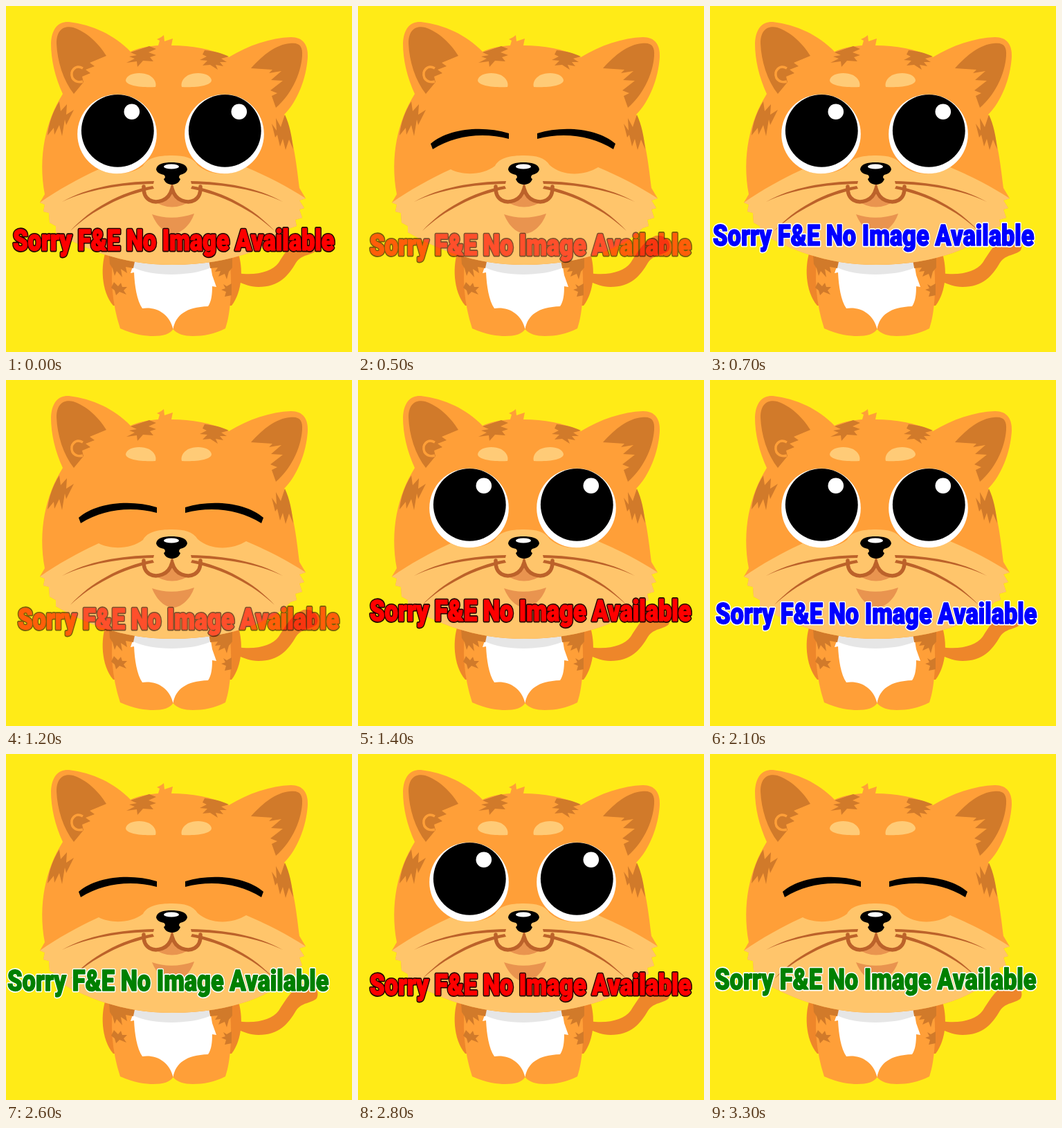
These frames come from a looping animation (500 px wide and 500 px high, 3.5 s). An HTML page:

```html
<!DOCTYPE html>
<html lang="en">
<head>
<meta charset="utf-8">
<title>No image available</title>
<style>
html, body { margin: 0; width: 100%; height: 100%; overflow: hidden; background: #ffeb17; }
svg { display: block; width: 100vw; height: 100vh; }

.base { fill: #ff9f38; }
.shade { fill: #ee862a; }
.dark { fill: #d17a2a; }
.light { fill: #ffc56b; }
.brow { fill: #ffcb77; }
.lip { fill: #e9944f; }
.whisker { fill: #bc622a; }
.mouth { fill: none; stroke: #bc622a; stroke-width: 5.5; stroke-linecap: round; }

/* Eyes: 500 ms open, 200 ms shut */
.open { animation: open 700ms step-end infinite; }
.shut { animation: shut 700ms step-end infinite; }
@keyframes open { 0% { visibility: visible; } 71.4286%, 100% { visibility: hidden; } }
@keyframes shut { 0% { visibility: hidden; } 71.4286%, 100% { visibility: visible; } }

.caption { animation: hop 3500ms step-end infinite, tint 3500ms step-end infinite; }
.caption text {
  font: 900 42px Roboto, "Liberation Sans", sans-serif;
  stroke-linejoin: round;
  text-rendering: geometricPrecision;
}
.rim { stroke: var(--rim); stroke-width: 5px; }
.ink { fill: var(--ink); stroke: var(--ink); stroke-width: 1.6px; }
@keyframes hop {
  0% { transform: translate(10px, 353px); }
  14.2857% { transform: translate(17px, 360px); }
  20% { transform: translate(4px, 346px); }
  34.2857% { transform: translate(17px, 360px); }
  40% { transform: translate(17px, 348px); }
  54.2857% { transform: translate(2px, 342px); }
  60% { transform: translate(8px, 352px); }
  74.2857% { transform: translate(2px, 342px); }
  80% { transform: translate(17px, 348px); }
  94.2857%, 100% { transform: translate(7px, 340px); }
}
@keyframes tint {
  0%, 40%, 80% { --ink: #f00; --rim: #200; opacity: 1; }
  14.2857%, 34.2857% { --ink: #f00; --rim: #200; opacity: .6; }
  20%, 60% { --ink: #00f; --rim: #fff; opacity: 1; }
  54.2857%, 74.2857%, 94.2857%, 100% { --ink: #008000; --rim: #fff; opacity: 1; }
}
</style>
</head>
<body>
<svg viewBox="0 0 500 500">
  <defs>
    <g id="eye">
      <circle cx="160.5" cy="185" r="57.3" fill="#fff"/>
      <circle cx="161.3" cy="180.3" r="52.4"/>
      <circle cx="181.8" cy="152.7" r="11.3" fill="#fff"/>
    </g>
    <path id="brow" class="brow" d="M173 107C175 97 194 94 207 100C214 104 218 111 216 117C198 118 173 116 173 107Z"/>
    <path id="lid" d="M105 199C130 177 180 172 218 184V192C180 182 140 187 108 207Z"/>
    <path id="whiskers" class="whisker" d="M81 283C118 262 165 254 214 253L213 257C165 258 118 265 81 283Z
      M93 325C122 293 165 269 212 260L214 264C168 273 125 295 93 325Z"/>
  </defs>

  <!-- tail and body -->
  <path class="shade" d="M334 386C362 390 384 384 394 371C404 356 412 340 430 332C447 330 454 345 449 353C441 361 428 358 419 371C408 390 394 406 365 406C352 406 345 402 334 398Z"/>
  <path class="shade" d="M144 355C137 375 137 412 155 433H326C342 412 343 378 335 355Z"/>
  <path class="base" d="M156 355C150 390 153 430 165 466C185 475 202 477 213 477C227 477 237 474 241.500 467C247 474 258 477 270 477C285 477 302 474 317 466C325 444 328 400 322 355Z"/>
  <path fill="#fff" d="M187 365L180 386L185 385C186 405 189 425 197 437C215 434 236 443 241.500 467C245 447 260 435 292 434C297 427 298 416 298 405L304 406L298 389L294 365Z"/>
  <path fill="#e6e6e6" d="M187 365L184 378C210 391 265 391 294 379V365Z"/>
  <path class="dark" d="M149 360H188L184 379L173 377L175 386L166 380L168 392L160 383L157 390L154 379L150 373Z
    M156 399L162 405L166 400L168 406L175 406L170 411L174 417L164 413L159 418L157 411L152 407Z
    M327 360H292L295 379L306 378L302 384L310 383L307 391L316 387L319 395L322 384L327 378Z
    M326 401L319 405L314 402L317 408L311 410L318 413L316 420L326 418Z"/>

  <!-- head -->
  <path class="base" d="M82 127C71 103 65 78 65 54C66 31 77 22 91 23C125 27 157 42 180 66C190 61 205 58 220 57L222 50L218 48C223 46 226 44 228 42L229 51L241 47L239 57C268 57 297 62 322 74C350 57 382 46 412 45C429 45 437 56 436 74C434 105 421 138 402 157C415 187 420 230 424 263L433 278L424 281L431 292L424 294L428 306L418 309L420 318L411 321C388 346 330 374 240 374C165 374 112 350 72 327L72 318L63 313L62 299L54 297L56 287L49 284L56 272C46 218 57 167 82 127Z"/>
  <path class="light" d="M49 284C75 266 105 249 134 236C151 245 180 245 198 231C204 219 221 216 240 216C258 216 270 219 277 230C296 247 328 245 347 233C378 246 407 261 433 278L424 281L431 292L424 294L428 306L418 309L420 318L411 321C388 346 330 374 240 374C165 374 112 350 72 327L72 318L63 313L62 299L54 297L56 287Z"/>

  <!-- ears and stripes -->
  <path class="dark" d="M73 54C73 34 84 28 97 31C116 37 134 54 145 72L121 82L128 87L115 92L122 97L110 102L112 110L98 127C83 108 74 80 73 54Z
    M354 90C372 70 390 56 410 54C424 52 429 58 428 72C426 101 410 130 390 147L384 130L392 126L382 122L400 108L383 107L398 94L380 97L385 92Z
    M180 67L207 58L217 62L206 67L217 71L208 74L213 80L198 79L190 88L189 80L174 82L186 76L178 73L189 71Z
    M287 64C300 65 312 68 322 73L311 76L319 81L309 81L314 87L303 85L306 92L295 85L284 86L291 79L280 78L290 73L284 70Z
    M77 138L79 152L88 142L87 157L98 150L87 172L85 164L81 188L77 172L70 186L69 176L60 187C62 168 68 152 77 138Z
    M403 157C410 172 413 188 415 207L409 193L404 208L400 192L396 203L392 186L389 190L384 170L391 180L390 162L397 175Z"/>
  <path d="M111 90C100 84 92 94 96 104C99 109 105 111 111 109" fill="none" stroke="#ff9f38" stroke-width="3.500"/>
  <use href="#brow"/>
  <use href="#brow" transform="matrix(-1 0 0 1 470 0)"/>

  <!-- eyes -->
  <g class="open">
    <use href="#eye"/>
    <use href="#eye" x="155"/>
  </g>
  <g class="shut">
    <use href="#lid"/>
    <use href="#lid" transform="matrix(-1 0 0 1 477 0)"/>
  </g>

  <!-- muzzle -->
  <path class="lip" d="M212 281Q240 300 268 281L240 268Z"/>
  <path class="light" d="M199 261C198 281 213 286 226 281C234 278 238 271 240 264C242 271 246 278 254 281C267 286 282 281 281 261Z"/>
  <path class="lip" d="M211 301C230 308 252 307 272 300C266 318 252 329 241 329C228 328 217 316 211 301Z"/>
  <use href="#whiskers"/>
  <use href="#whiskers" transform="matrix(-1 0 0 1 481 0)"/>
  <path class="mouth" d="M199 261C198 281 213 286 226 281C234 278 238 271 240 264C242 271 246 278 254 281C267 286 282 281 281 261"/>
  <path d="M217 236C218 228 228 226 239 226S261 228 262 236C261 241 256 243 252 244C249 246 250 249 252 250C250 256 245 258 240 258C235 258 230 256 228 250C230 249 231 246 228 244C223 243 218 241 217 236Z"/>
  <ellipse cx="239" cy="232" rx="11" ry="3.600" fill="#fff"/>

  <g class="caption">
    <g transform="scale(.82 1)">
      <text id="words" class="rim">Sorry F&amp;E No Image Available</text>
      <text class="ink">Sorry F&amp;E No Image Available</text>
    </g>
  </g>
</svg>
</body>
</html>
```
